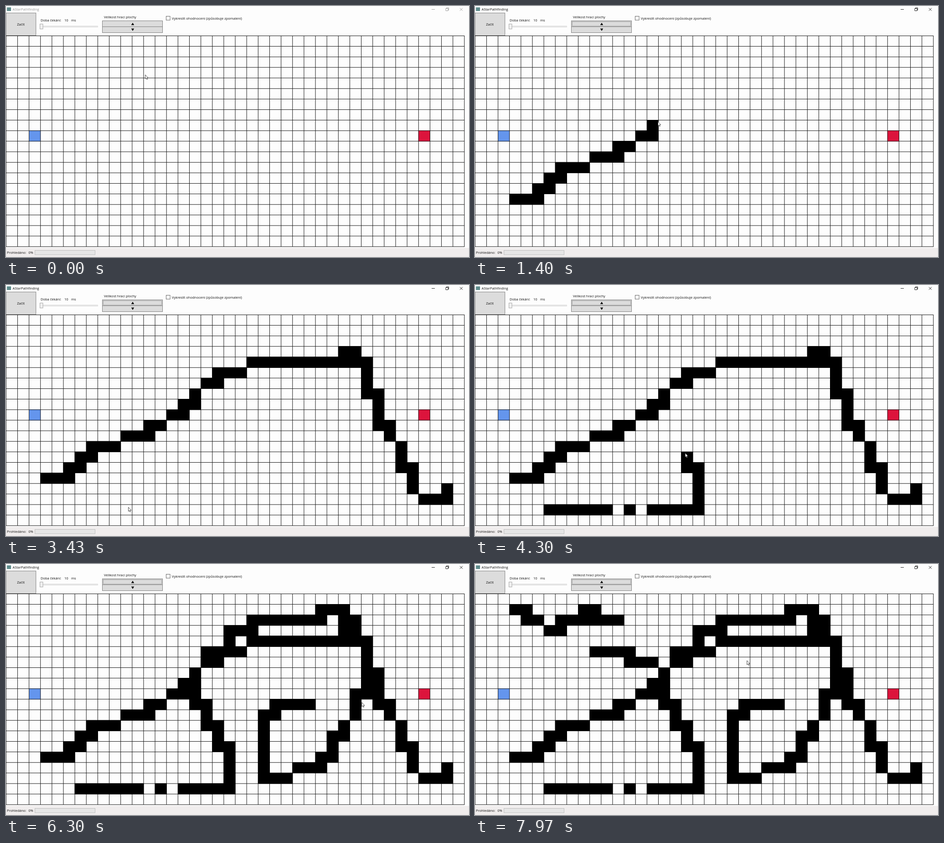
Animation, 1016 px wide and 551 px high, one loop 8 s. Source, as an HTML page:

```html
<!DOCTYPE html>
<html lang="cs">
<head>
<meta charset="utf-8">
<title>AStarPathfinding</title>
<style>
  html, body { margin: 0; width: 100%; height: 100%; overflow: hidden; background: #fdfdfd; }
  svg { display: block; width: 100vw; height: 100vh; }
  text { font: 7.5px "Open Sans", "Noto Sans", sans-serif; fill: #111; }
  .btn { fill: #dcdcdc; stroke: #808080; }
  #bar text { font-size: 7.4px; fill: #999; }
  #bar path { fill: none; stroke: #999; stroke-width: .9; }
  #bar.on text { fill: #111; }
  #bar.on path { stroke: #111; }
</style>
</head>
<body>
<svg viewBox="0 0 1016 551" preserveAspectRatio="none">
  <rect width="1016" height="551" fill="#fdfdfd"/>

  <rect x="2" y="3" width="9" height="8" fill="#5f8c8c"/>
  <g id="bar">
    <text x="14.5" y="10.2">AStarPathfinding</text>
    <path d="M934 7.5h7M965 5.5h5v5h-5zM966.5 5.5v-1.5h5v5h-1.5M996 4.5l6 6M1002 4.5l-6 6"/>
  </g>

  <rect class="btn" x=".2" y="15.3" width="65.5" height="49.5"/>
  <text x="24.3" y="43.4">Začít</text>

  <text x="76" y="33.6">Doba čekání:</text>
  <text x="128" y="33.6">10</text>
  <text x="143" y="33.6">ms</text>
  <rect x="75.5" y="43.9" width="126" height="2.4" fill="#e7e7e7" stroke="#d4d4d4" stroke-width=".7"/>
  <rect x="74.5" y="39.5" width="6.5" height="11" fill="#efefef" stroke="#aaa"/>

  <text x="215" y="27">Velikost hrací plochy</text>
  <rect class="btn" x="211.5" y="32.5" width="132" height="13"/>
  <rect class="btn" x="211.5" y="45.5" width="132" height="13"/>
  <path d="M274.8 42h6.4l-3.2 -5.2zM274.8 49.6h6.4l-3.2 5.2z" fill="#000"/>
  <rect id="focus" x="213.5" y="34.5" width="128" height="9.5" fill="none" stroke="#444" stroke-width=".8" stroke-dasharray="1 1"/>

  <rect x="351.5" y="22.5" width="8.5" height="8.5" fill="#fff" stroke="#666"/>
  <text x="364" y="29.8">Vykreslit ohodnocení (způsobuje zpomalení)</text>

  <path id="start" fill="#6495ed"/>
  <path id="goal" fill="#dc143c"/>
  <path id="grid" fill="#161616"/>
  <path id="walls" fill="#000"/>

  <rect y="531" width="1016" height="20" fill="#f0eded"/>
  <text x="2" y="544">Prohledáno:</text>
  <text x="49.3" y="544">0%</text>
  <rect x="63.5" y="536.5" width="132" height="9.5" fill="#e6e6e6" stroke="#bebebe"/>

  <path id="cursor" d="M0 0V9L2 7.2L3.4 10.3L4.8 9.7L3.4 6.7H6.2z" fill="#fff" stroke="#222" stroke-width=".8"/>
</svg>
<script>
const LOOP = 8000, CLICK = 930, COLS = 40, ROWS = 20, W = 25.14, H = 23.14;
const $ = id => document.getElementById(id);
const colX = c => W * c - .25;
const rowY = r => H * r + 64.95;
const box = (c, r, w, h) => `M${colX(c)} ${rowY(r)}h${w}v${h}h${-w}z`;
const cellBox = (c, r) => box(c, r, W + 1, H + 1);

// Pointer drags in cell units: start ms, end ms, path; "L" goes on from the last drag
const drags = [
  [CLICK, 1395, 'M3.1 15.5L5.2 15.3L7.6 12.8L10 12L12.4 11L14 10L15.98 8.17'],
  [1470, 2430, 'L17 7L18.4 6L21 5L29.2 4.1L30 3.5L31.5 5L31.8 7.2L32.98 10.7'],
  [2500, 2950, 'L34 12L35.1 14.6L36 17L38.5 17.4L38.6 16.3'],
  [3580, 3720, 'M6.1 18.6L11.9 18.6'],
  [3760, 3780, 'M13.2 18.6L13.8 18.6'],
  [3820, 4300, 'M15.1 18.6L19.5 18.5L19.4 15.1L18.36 13.14'],
  [4370, 5030, 'L16.5 9.3L17 7L17.4 5.5L19.2 5L19.5 3.5L21.4 3.1'],
  [5030, 5170, 'L21.6 2.5L26.95 2.15'],
  [5230, 5400, 'L27.6 1.6L29.3 1.5L30.4 2.6'],
  [5500, 6000, 'M26.9 10.4L23.6 10.6L22.5 11.7L22.5 17.4L25 17L27.3 16.1L28.3 14.9L30 12L30.6 9.6L31.6 8.6'],
  [6830, 7400, 'M12.9 2.5L10.8 2.2L10 1.5L9.2 2.2L7.6 2.7L6.5 3.5L6 3L3.3 1.4'],
  [7610, 7850, 'M10.1 5.2L15.8 6.5']
];
const rest = (from, to, x, y) => [from, to, `M${x} ${y}`];
const rests = [
  rest(0, 30, 12.17, 3.72),
  rest(6300, 6430, 31.07, 10.33),
  rest(7970, LOOP, 23.75, 6.36)
];

let last;
const moves = [...drags, ...rests].sort((a, b) => a[0] - b[0]).map(([from, to, d]) => {
  const path = document.createElementNS('http://www.w3.org/2000/svg', 'path');
  path.setAttribute('d', d[0] === 'M' ? d : `M${last.x} ${last.y}${d}`);
  const size = path.getTotalLength();
  last = path.getPointAtLength(size);
  return { from, to, size, at: u => path.getPointAtLength(size * u) };
});

// Each drag fills the cells it crosses, except those it only clips at a corner
const cells = new Map();
const gap = v => Math.abs(v - Math.round(v));
for (const m of moves) {
  for (let s = 0; s < m.size; s += .02) {
    const { x, y } = m.at(s / m.size);
    if (gap(x) + gap(y) < .06) continue;
    const d = cellBox(Math.floor(x), Math.floor(y));
    if (!cells.has(d)) cells.set(d, m.from + (m.to - m.from) * s / m.size);
  }
}

function pointer(t) {
  const i = moves.findLastIndex(m => m.from <= t);
  const m = moves[i], next = moves[i + 1];
  if (t <= m.to || !next) return m.at(Math.min(1, (t - m.from) / (m.to - m.from)));
  const u = (t - m.to) / (next.from - m.to), e = u * u * (3 - 2 * u);
  const a = m.at(1), b = next.at(0);
  return { x: a.x + (b.x - a.x) * e, y: a.y + (b.y - a.y) * e };
}

let lines = '';
for (let c = 0; c <= COLS; c++) lines += box(c, 0, 1, H * ROWS + 1);
for (let r = 0; r <= ROWS; r++) lines += box(0, r, W * COLS + 1, 1);
$('grid').setAttribute('d', lines);
$('start').setAttribute('d', cellBox(2, 9));
$('goal').setAttribute('d', cellBox(36, 9));

let shown = -1;
function draw(t) {
  const done = [...cells].filter(([, at]) => at <= t);
  if (done.length !== shown) {
    shown = done.length;
    $('walls').setAttribute('d', done.map(([d]) => d).join(''));
  }
  const active = t >= CLICK;
  $('bar').classList.toggle('on', active);
  $('focus').style.display = active ? '' : 'none';
  const { x, y } = pointer(t);
  $('cursor').setAttribute('transform', `translate(${colX(x)} ${rowY(y)})`);
}

const begin = performance.now();
function tick() {
  draw((performance.now() - begin) % LOOP);
  requestAnimationFrame(tick);
}
tick();
</script>
</body>
</html>
```
